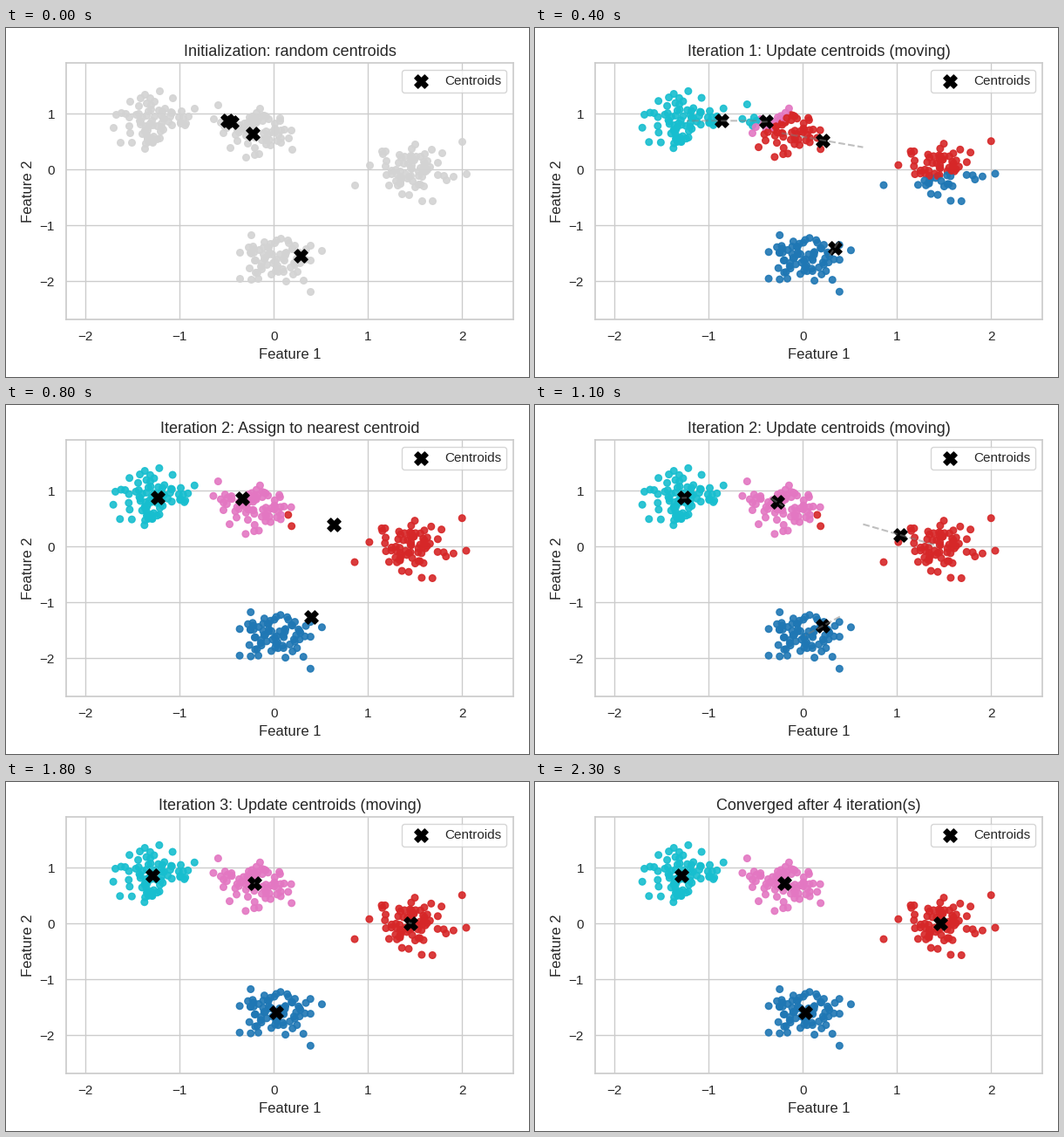
A matplotlib script that plays this animation: 600x400 px, repeating every 2.4 s.

```python
import numpy as np
import matplotlib.pyplot as plt
from matplotlib.animation import FuncAnimation

GRID, INK = "0.8", "0.15"
plt.rcParams.update({
    "font.family": "Liberation Sans", "font.size": 12,
    "text.color": INK, "axes.labelcolor": INK,
    "xtick.color": INK, "ytick.color": INK,
    "axes.labelsize": 12, "axes.titlesize": 13,
    "xtick.labelsize": 11, "ytick.labelsize": 11, "legend.fontsize": 11,
    "axes.edgecolor": GRID, "axes.linewidth": 1.25,
    "axes.grid": True, "axes.axisbelow": True,
    "grid.color": GRID, "grid.linewidth": 1,
    "xtick.bottom": False, "ytick.left": False,
    "xtick.major.size": 6, "ytick.major.size": 6,
})

K, N, STD, MOVES = 4, 300, 1.3, 6


def make_data(seed=7):
    """Shuffled Gaussian blobs, standardized per feature."""
    rng = np.random.RandomState(seed)
    centers = rng.uniform(-10, 10, (K, 2))
    pts = np.concatenate([rng.normal(c, STD, (N // K, 2)) for c in centers])
    order = np.arange(N)
    rng.shuffle(order)
    pts = pts[order]
    return (pts - pts.mean(0)) / pts.std(0)


def assign(pts, cents):
    return np.linalg.norm(pts[:, None] - cents, axis=2).argmin(1)


def build_steps(pts, cents):
    """List of (title, labels, centroids, trail ends) for one loop."""
    steps = [("Initialization: random centroids", None, cents, None)]
    for it in range(1, 5):
        labels = assign(pts, cents)
        steps.append((f"Iteration {it}: Assign to nearest centroid",
                      labels, cents, None))
        new = np.array([pts[labels == k].mean(0) for k in range(K)])
        if np.allclose(new, cents, atol=1e-4):
            break
        for m in range(1, MOVES + 1):
            pos = cents + (new - cents) * m / MOVES
            steps.append((f"Iteration {it}: Update centroids (moving)",
                          labels, pos, (cents, new)))
        cents = new
    steps.append((f"Converged after {it} iteration(s)", labels, cents, None))
    return steps


X = make_data()
seeds = np.array([(0.285, -1.545), (-0.225, 0.66), (-0.44, 0.85), (-0.494, 0.87)])
start = X[[np.linalg.norm(X - s, axis=1).argmin() for s in seeds]]
steps = build_steps(X, start)
palette = plt.get_cmap("tab10")([0, 3, 6, 9])

fig, ax = plt.subplots(figsize=(6, 4), dpi=100)
dots = ax.scatter(*X.T, s=30, c="lightgray", alpha=0.9, linewidths=1)
marks = ax.scatter(*start.T, s=120, c="black", marker="X", label="Centroids")
trails = [ax.plot([], [], "--", color="gray", alpha=0.5, lw=1.5)[0]
          for _ in range(K)]
ax.set_xlim(X[:, 0].min() - 0.5, X[:, 0].max() + 0.5)
ax.set_ylim(X[:, 1].min() - 0.5, X[:, 1].max() + 0.5)
ax.set_xlabel("Feature 1")
ax.set_ylabel("Feature 2")
title = ax.set_title(steps[0][0])
ax.legend(loc="upper right")
fig.tight_layout()
fig.subplots_adjust(top=0.899)


def update(i):
    text, labels, cents, ends = steps[i]
    title.set_text(text)
    dots.set_facecolor("lightgray" if labels is None else palette[labels])
    marks.set_offsets(cents)
    for k, line in enumerate(trails):
        if ends is None:
            line.set_data([], [])
        else:
            line.set_data(*np.array([ends[0][k], ends[1][k]]).T)
    return [title, dots, marks, *trails]


anim = FuncAnimation(fig, update, frames=len(steps), interval=100, repeat=True)
plt.show()
```
